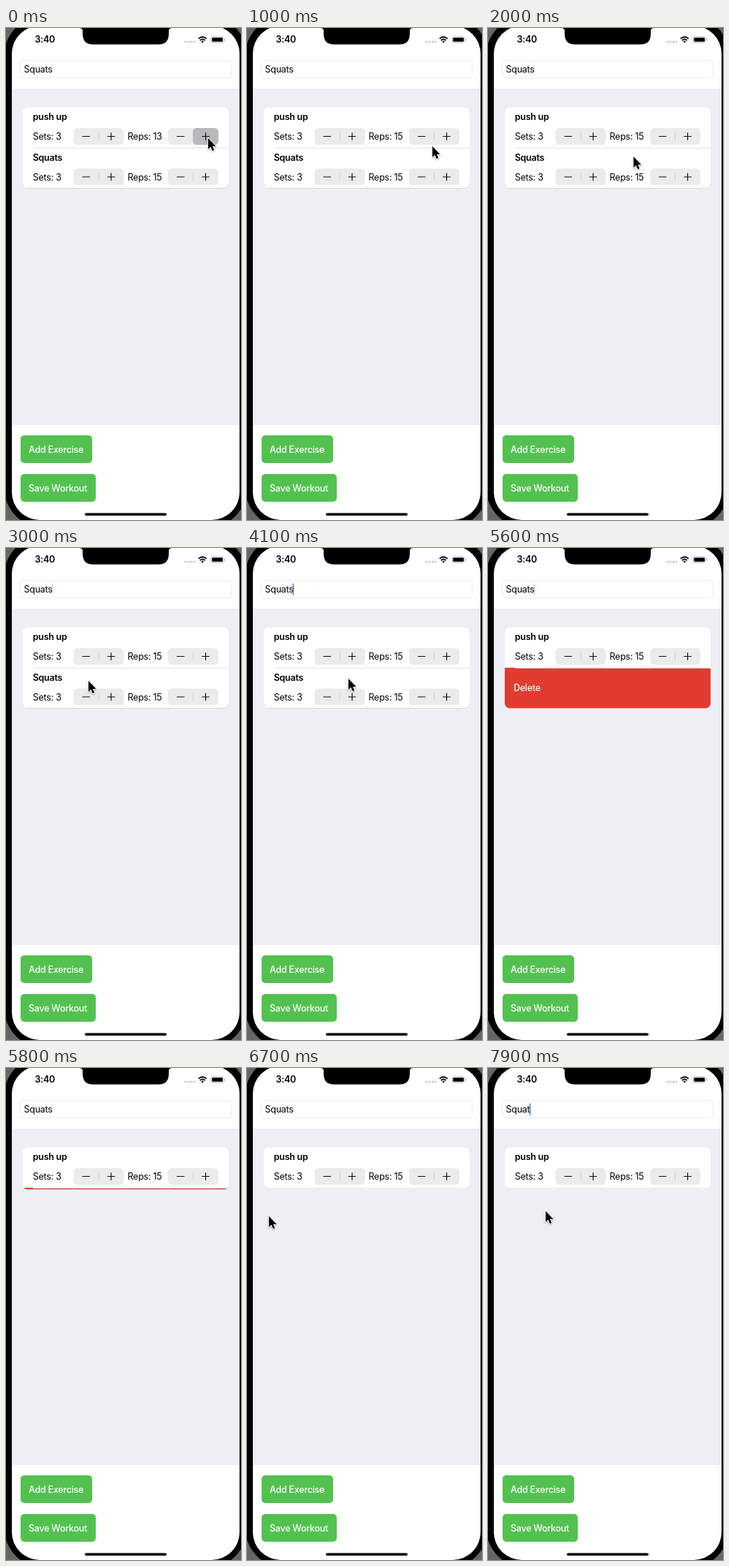
Recreate the animation shown at these times as an HTML page. Size 322 by 674 pixels, loop 8 s.

```html
<!DOCTYPE html>
<html lang="en">
<head>
<meta charset="utf-8">
<title>Workout builder</title>
<style>
  html, body { margin: 0; width: 100%; height: 100%; overflow: hidden; background: #666; }
  svg { display: block; width: 322px; height: 674px; }
  text { font: 12.5px Inter, "Open Sans", sans-serif; letter-spacing: -.25px; }
  .bold { font-weight: 600; }
  .label { font-weight: 500; fill: #fff; }
  .line { fill: none; stroke: #111; stroke-width: 1.2; }
</style>
</head>
<body>
<svg viewBox="0 0 322 674">
  <defs>
    <clipPath id="cardClip"><rect id="cardShape" x="23" y="109" width="282" height="111" rx="6.5"/></clipPath>
    <clipPath id="screenClip"><rect x="8" y="-3" width="312" height="677" rx="38"/></clipPath>
  </defs>
  <rect x="-3" y="-18" width="334" height="704" rx="58"/>
  <g clip-path="url(#screenClip)">
    <rect width="322" height="674" fill="#fff"/>
    <rect y="83" width="322" height="461" fill="#eeeff5"/>
    <rect x="19.5" y="44.5" width="289" height="24" rx="4" fill="#fff" stroke="#ededee"/>
    <text id="field" x="24.5" y="61"></text>
    <rect id="caret" y="48.5" width="1.5" height="16" fill="#3478d8"/>
    <g clip-path="url(#cardClip)">
      <rect x="23" y="109" width="282" height="111" fill="#fff"/>
      <g id="first"></g>
      <g id="doomed">
        <rect x="23" y="164" width="282" height="56" fill="#e23b30"/>
        <text id="deleteLabel" class="label" y="196">Delete</text>
        <g id="second"><rect x="23" y="164" width="282" height="56" fill="#fff"/></g>
      </g>
      <path id="divider" d="M37 164.5H305" stroke="#e4e4e7"/>
    </g>
    <g fill="#53c150">
      <rect x="20" y="558" width="98" height="38" rx="5"/>
      <rect x="20" y="611" width="103" height="38" rx="5"/>
    </g>
    <text class="label" x="31" y="582">Add Exercise</text>
    <text class="label" x="31" y="635">Save Workout</text>
    <rect x="108" y="664.5" width="112" height="3.6" rx="1.8"/>
    <text class="bold" x="39.5" y="20.3">3:40</text>
    <path d="M246 19h12.5" stroke="#bdbdbd" stroke-width="2.6" stroke-linecap="round" stroke-dasharray="0 4"/>
    <g fill="none" stroke="#000" stroke-width="1.8">
      <path d="M263.8 14.6Q269.3 9.8 274.8 14.6M265.8 17Q269.3 13.8 272.8 17"/>
      <path d="M267.4 18.3Q269.3 16.8 271.2 18.3L269.3 20.4Z" fill="#000" stroke="none"/>
    </g>
    <rect x="280.9" y="11.9" width="17.4" height="8.2" rx="2.4" fill="none" stroke="#aaa" stroke-width=".8"/>
    <rect x="282.2" y="13.2" width="14.8" height="5.6" rx="1.3"/>
    <rect x="299.2" y="14.5" width="1" height="3" rx=".5" fill="#aaa"/>
  </g>
  <path d="M100 0Q105 0 105 4V8Q105 22.5 119 22.5H209Q223 22.5 223 8V4Q223 0 228 0Z"/>
  <path id="cursor" d="M0 0V15L3.4 11.8L5.8 17.2L8.2 16.1L5.9 10.9H10.6Z"
        stroke="#fff" stroke-width="1.6" paint-order="stroke" stroke-linejoin="round"
        style="filter: drop-shadow(0 1px 1px #0005)"/>
</svg>
<script>
const $ = id => document.getElementById(id);
const LOOP = 8000;

const stepper = (x, y, pressId) => `
  <rect x="${x}" y="${y}" width="69" height="23" rx="5.5" fill="#ebebec"/>
  <path d="M${x + 34.5} ${y + 6}v11" stroke="#cfcfd2"/>
  ${pressId ? `<rect id="${pressId}" x="${x + 34}" y="${y}" width="35" height="23" rx="5.5" fill="#b9b9bb"/>` : ''}
  <path class="line" d="M${x + 12} ${y + 11.5}h10.5M${x + 46.3} ${y + 11.5}h10.5m-5.25-5.25v10.5"/>`;

const row = (name, y, repsId, pressId) => `
  <text class="bold" x="36.7" y="${y + 17}">${name}</text>
  <text x="36.7" y="${y + 44}">Sets: 3</text>
  <text x="166.5" y="${y + 44}" id="${repsId}">Reps: 15</text>
  ${stepper(92.5, y + 28, '')}${stepper(222, y + 28, pressId)}`;

$('first').innerHTML = row('push up', 109, 'reps', 'press');
$('second').innerHTML += row('Squats', 164.5, 'reps2', '');

// Linear interpolation through [time, ...values] keys
function track(keys, t) {
  const i = keys.findIndex(k => k[0] > t);
  if (i < 0) return keys[keys.length - 1].slice(1);
  if (i === 0) return keys[0].slice(1);
  const a = keys[i - 1], b = keys[i], f = (t - a[0]) / (b[0] - a[0]);
  return a.slice(1).map((v, j) => v + (b[j + 1] - v) * f);
}

const pointer = [
  [0, 277, 151], [700, 277, 151], [900, 264, 157], [1000, 254, 162], [1800, 203, 175],
  [2700, 187, 181], [3000, 113, 182], [3600, 116, 181], [4100, 139, 179], [4500, 309, 182],
  [5200, 309, 184], [5400, 177, 182], [5500, 70, 182], [5600, -20, 184],
  [6400, -20, 206], [6700, 30, 203], [7200, 79, 196], [8000, 79, 196]
];
const slide = [[5400, 0], [5500, 107], [5600, 282]];
const collapse = [[5600, 55.5], [5700, 25], [5800, 2.3], [5900, 0]];
const clamp = v => Math.max(0, Math.min(1, v));

function draw(t) {
  const [x, y] = track(pointer, t);
  $('cursor').setAttribute('transform', `translate(${x} ${y})`);

  $('reps').textContent = 'Reps: ' + (t < 300 ? 13 : t < 600 ? 14 : 15);
  $('press').style.opacity = t < 700 && t % 300 < 100 ? 1 : 0;

  const [shift] = track(slide, t), [height] = track(collapse, t);
  $('second').setAttribute('transform', `translate(${-shift} 0)`);
  $('deleteLabel').setAttribute('x', Math.max(35, 317 - shift));
  $('cardShape').setAttribute('height', 55 + height);
  $('doomed').style.display = height ? '' : 'none';
  $('divider').style.display = height ? '' : 'none';

  const erased = t >= 7800, p = t % 990;
  $('field').textContent = erased ? 'Squat' : 'Squats';
  $('caret').setAttribute('x', erased ? 56.8 : 62.6);
  $('caret').style.opacity = erased ? 1 : Math.min(clamp((p - 10) / 80), clamp((700 - p) / 150));
}

const start = performance.now();
function tick() {
  const t = (performance.now() - start) % LOOP;
  draw(Math.floor(t / 100) * 100);
  requestAnimationFrame(tick);
}
tick();
</script>
</body>
</html>
```
